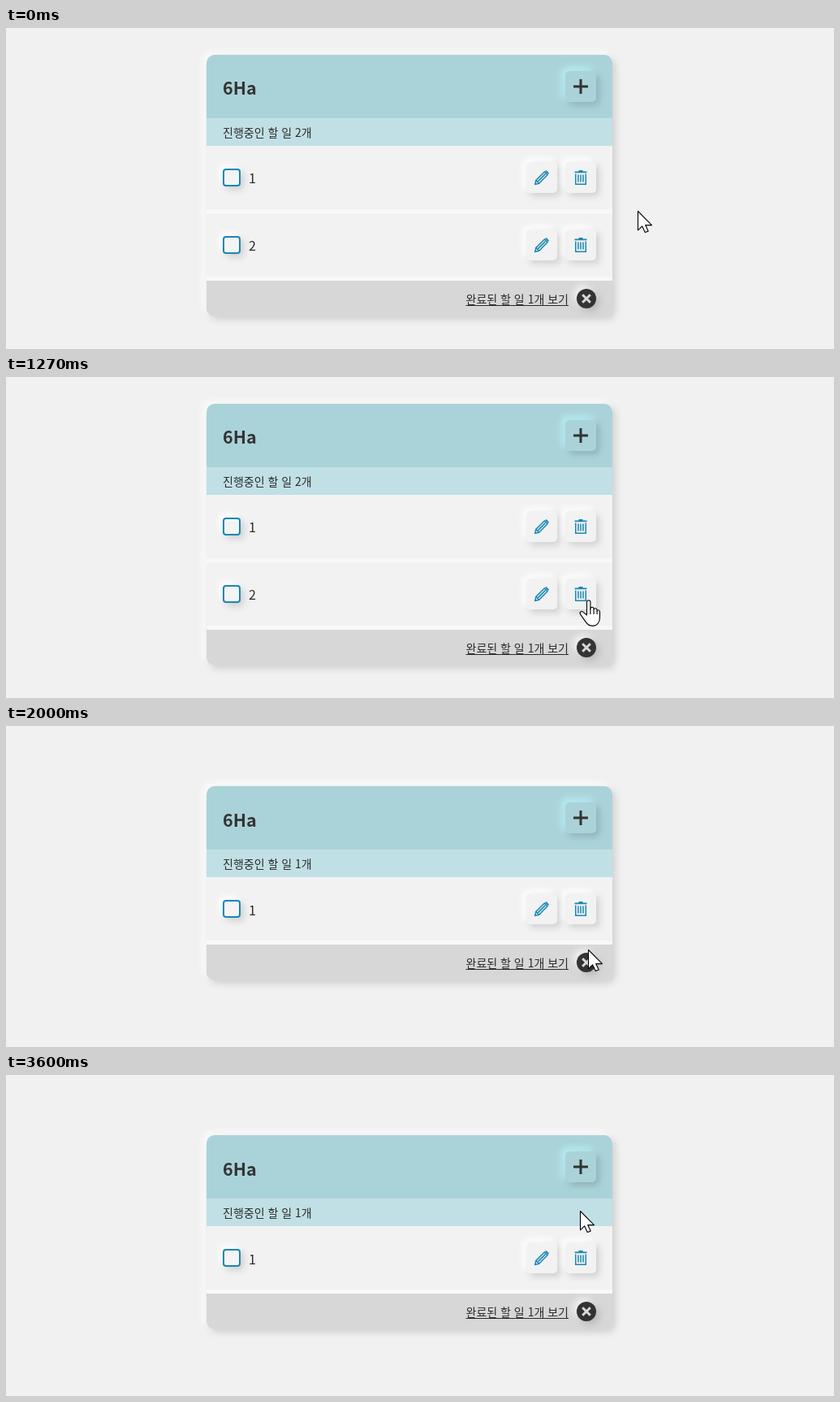
Write an HTML page that moves like this. It is 1020 px wide and 395 px high and loops after 3.67 s.

```html
<!DOCTYPE html>
<html lang="ko">
<head>
<meta charset="utf-8">
<title>할 일</title>
<style>
  * { box-sizing: border-box; }
  html, body { margin: 0; width: 100%; height: 100%; overflow: hidden; background: #f1f1f1; }
  body { position: relative; color: #2b2b2b; font: 16px "Noto Sans CJK KR", "Noto Sans CJK", sans-serif; }
  .card {
    --dark: #d0d0d0; --light: #fff;
    position: absolute; left: 247px; top: 33px; width: 500px; border-radius: 10px;
    box-shadow: 4px 4px 8px var(--dark), -4px -4px 8px #fcfcfc;
  }
  .card > div { display: flex; align-items: center; padding: 0 20px; }
  .head {
    --dark: #8fb2b7; --light: #baf1f7;
    height: 78px; background: #aad3d9; border-radius: 10px 10px 0 0; justify-content: space-between;
  }
  h1 { margin: 0; font-size: 21.5px; font-weight: 700; color: #333; }
  .count { height: 34px; background: #c1e0e5; font-size: 14px; }
  .card > .row { height: 83px; background: #f2f2f2; border-bottom: 5px solid #f8f8f8; }
  .row span { flex: 1; margin-left: 10px; }
  .foot {
    --dark: #b9b9b9; --light: #f4f4f4;
    height: 44px; background: #d7d7d7; border-radius: 0 0 10px 10px; justify-content: flex-end; font-size: 14px;
  }
  .foot u { margin-right: 10px; text-underline-offset: 2px; }
  .btn, .box, .close { box-shadow: 4px 4px 8px var(--dark), -4px -4px 8px var(--light); flex: none; }
  .btn { width: 38px; height: 38px; border-radius: 5px; }
  .btn + .btn { margin-left: 10px; }
  .btn.down { box-shadow: inset 4px 4px 8px var(--dark), inset -4px -4px 8px var(--light); }
  .box { width: 22px; height: 22px; border: 2px solid #1a87b0; border-radius: 4px; background: #f4f4f4; }
  .close { width: 24px; height: 24px; border-radius: 50%; background: #333; }
  svg { display: block; fill: none; }
  .row svg { stroke: #1a87b0; stroke-width: 1.5; }
  .solid { fill: #1a87b0; stroke: none; }
  .one { top: 74px; }
  .one h1, .one span { position: relative; top: 1px; }
  .one #second { display: none !important; }
  #cursor { position: absolute; left: 0; top: 0; overflow: visible; pointer-events: none; }
  #cursor path { fill: #fff; stroke: #000; stroke-width: 1.1; stroke-linejoin: round; }
</style>
</head>
<body>
<svg width="0" height="0" style="position:absolute">
  <symbol id="pen" viewBox="-19 -19 38 38">
    <path d="M-8.2 8.2L-7.2 3.4L3.3-7L7-3.3L-3.4 7.2ZM-7 3.6L-3.6 7M-4.6 4.6L4.4-4.4"/>
    <path class="solid" d="M4-7.8L5.6-9L9-5.6L7.8-4Z"/>
  </symbol>
  <symbol id="bin" viewBox="-19 -19 38 38">
    <path class="solid" d="M-2.5-9h5v1.5h5v1.7h-15v-1.7h5z"/>
    <path d="M-6.25-4.5V8.25H6.25V-4.5M-3-3.5V5.5M0-3.5V5.5M3-3.5V5.5"/>
  </symbol>
</svg>

<div class="card" id="card">
  <div class="head">
    <h1>6Ha</h1>
    <svg class="btn" viewBox="-19 -19 38 38"><path d="M-9 0H9M0-9V9" stroke="#333" stroke-width="3"/></svg>
  </div>
  <div class="count">진행중인 할 일&nbsp;<b id="left" style="font-weight:400">2</b>개</div>
  <div class="row">
    <i class="box"></i><span>1</span>
    <svg class="btn"><use href="#pen"/></svg>
    <svg class="btn"><use href="#bin"/></svg>
  </div>
  <div class="row" id="second">
    <i class="box"></i><span>2</span>
    <svg class="btn"><use href="#pen"/></svg>
    <svg class="btn" id="remove"><use href="#bin"/></svg>
  </div>
  <div class="foot">
    <u>완료된 할 일 1개 보기</u>
    <svg class="close" viewBox="-12 -12 24 24"><path d="M-4.8-4.8L4.8 4.8M4.8-4.8L-4.8 4.8" stroke="#d9d9d9" stroke-width="3"/></svg>
  </div>
</div>

<svg id="cursor" width="1" height="1">
  <path id="arrow" d="M.5.5V23.8L5.6 18.8L9.3 26.6L13.2 24.9L9.7 17.6H17.5Z"/>
  <g id="hand" transform="translate(0 -1)">
    <path d="M-1.5 19V3a2.2 2.2 0 0 1 4.4 0v8.5c0-3 4.2-3 4.2 0v1c0-2.6 4-2.4 4 .6v1c0-2 3.4-1.8 3.4 1v7c0 5-3 10-8 10H5c-4 0-6-2-8-5l-6-8.5c-2.4-3.4 1-5.2 3.4-3z"/>
    <path d="M2.9 11v7M7.1 12.5V18M11.1 14v4"/>
  </g>
</svg>

<script>
  const LOOP = 3670, PRESS = 1800, REMOVE = 1930;
  // time, x, y, hand
  const moves = [
    [0, 778, 225, 0], [270, 772, 227, 0], [340, 755, 233, 0], [400, 738, 240, 0],
    [470, 729, 248, 0], [540, 723, 259, 1], [600, 719, 268, 1], [670, 718, 273, 1],
    [730, 717, 275, 1], [2000, 717, 275, 0], [3200, 711, 251, 0], [3270, 708, 231, 1],
    [3330, 707, 211, 1], [3400, 707, 193, 0], [3470, 707, 180, 0], [3530, 707, 171, 0],
    [3600, 707, 167, 0]
  ];
  const get = id => document.getElementById(id);
  const [card, left, remove, cursor, arrow, hand] =
    ["card", "left", "remove", "cursor", "arrow", "hand"].map(get);
  const show = (el, on) => { el.style.display = on ? "" : "none"; };

  function draw(t) {
    const gone = t >= REMOVE;
    card.classList.toggle("one", gone);
    left.textContent = gone ? 1 : 2;
    remove.classList.toggle("down", t >= PRESS && !gone);

    const [, x, y, pointing] = moves.filter(m => m[0] <= t).pop();
    cursor.style.transform = `translate(${x}px, ${y}px)`;
    show(hand, pointing);
    show(arrow, !pointing);
  }

  const start = performance.now();
  function tick() {
    draw((performance.now() - start) % LOOP);
    requestAnimationFrame(tick);
  }
  draw(0);
  requestAnimationFrame(tick);
</script>
</body>
</html>
```
